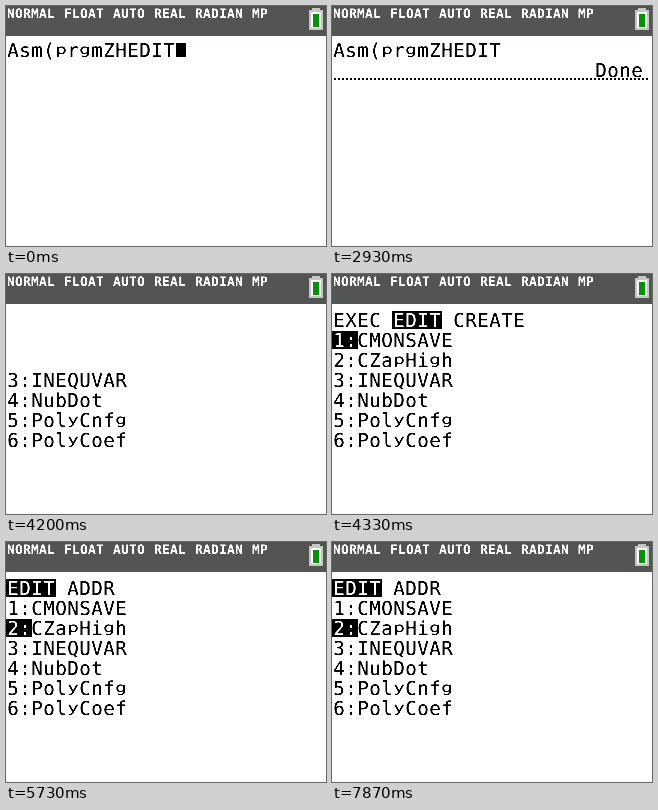
An HTML page that plays this animation: 320x240 px, repeating every 8000 ms.

```html
<!DOCTYPE html>
<html lang="en">
<head>
<meta charset="utf-8">
<title>Calculator program menu</title>
<style>
html, body { margin: 0; width: 100%; height: 100%; overflow: hidden; background: #fff; }
svg { display: block; width: 320px; height: 240px; }
text { font-family: "DejaVu Sans Mono", monospace; text-rendering: geometricPrecision; filter: url(#crisp); }
.large { font-size: 19.2px; letter-spacing: .44px; }
.status { font-size: 13px; font-weight: bold; letter-spacing: .174px; word-spacing: 1px; fill: #fff; }
</style>
</head>
<body>
<svg viewBox="0 0 320 240">
  <defs>
    <filter id="crisp">
      <feComponentTransfer><feFuncA type="linear" slope="2.4" intercept="-.6"/></feComponentTransfer>
    </filter>
  </defs>
  <rect width="320" height="240" fill="#fff"/>
  <rect width="320" height="30" fill="#525552"/>
  <text class="status" x="1" y="12">NORMAL FLOAT AUTO REAL RADIAN MP</text>
  <g id="battery">
    <path d="M306 2h8v2h3v20h-14V4h3z" fill="#c6c6c6"/>
    <rect x="305" y="6" width="10" height="16" fill="#fff"/>
    <rect x="307" y="8" width="6" height="13" fill="#009200"/>
  </g>
  <g id="screen"></g>
</svg>
<script>
const LOOP = 8000, CELL = 12, ROW = 20, CAP = 14, X_HEIGHT = 10.5;
const screen = document.getElementById('screen');

const rect = (x, y, w, h, fill = '#000') =>
  `<rect x="${x}" y="${y}" width="${w}" height="${h}" fill="${fill}"/>`;

// Letters with tails are squeezed so that they stand on the baseline.
function write(str, x, base, fill = '#000') {
  let out = '';
  for (const run of str.matchAll(/[gpy]|[^gpy ]+/g)) {
    const left = x + run.index * CELL + .22;
    const place = /[gpy]/.test(run[0])
      ? `transform="translate(${left} ${base - X_HEIGHT}) scale(1 .7)" y="${X_HEIGHT}"`
      : `x="${left}" y="${base}"`;
    out += `<text class="large" fill="${fill}" ${place}>${run[0]}</text>`;
  }
  return out;
}

// Home screen
const homeLine = (str, row, x = 1) => write(str, x, 37 + row * ROW + CAP);
const cursor = (col, row) => rect(2 + col * CELL, 37 + row * ROW, 10, CAP);
const busy = '<circle cx="297.5" cy="10" r="3.2" fill="none" stroke="#ff0" stroke-width="2" stroke-dasharray="1.7 .81"/>';
const command = homeLine('Asm(prgmZHEDIT', 0);
const prompt = command + cursor(14, 0);
const done = command + homeLine('Done', 1, 263) +
  '<path d="M2 73H316" stroke="#000" stroke-width="2" stroke-dasharray="2 2"/>';
const ready = done + cursor(0, 2);

// Menus
const programs = ['CMONSAVE', 'CZapHigh', 'INEQUVAR', 'NubDot', 'PolyCnfg', 'PolyCoef'];

function label(str, col, row, lit) {
  const x = col * CELL, top = 37 + row * ROW;
  const box = lit ? rect(x, top, str.length * CELL + 2, 18) : '';
  return box + write(str, x + 1, top + 2 + CAP, lit ? '#fff' : '#000');
}

function tabs(names, lit) {
  let col = 0, out = '';
  names.forEach((name, i) => {
    out += label(name, col, 0, i === lit);
    col += name.length + 1;
  });
  return out;
}

function list(lit, from = 1, to = 6) {
  let out = '';
  for (let n = from; n <= to; n++)
    out += label(n + ':', 0, n, n === lit) + label(programs[n - 1], 2, n);
  return out;
}

const programTabs = lit => tabs(['EXEC', 'EDIT', 'CREATE'], lit);
const editTabs = tabs(['EDIT', 'ADDR'], 0);
const editMenu = lit => editTabs + list(lit);
const halfColon = label('2:', 0, 2) + rect(14, 88, 12, 8, '#fff');

const steps = [
  [0, prompt], [70, command], [470, prompt], [800, command], [1130, prompt],
  [1530, command], [1600, command + busy], [1670, busy], [1800, command + busy],
  [1870, ready], [2200, done], [2600, ready], [2930, done],
  [3200, ''], [3270, programTabs(0)], [3330, programTabs(0) + list(1, 1, 2)],
  [3400, programTabs(0) + list(1, 1, 4)], [3470, programTabs(0) + list(1)],
  [4200, list(0, 3)], [4270, programTabs(1) + list(1, 1, 2)], [4330, programTabs(1) + list(1)],
  [5070, list(0, 3)], [5130, editTabs], [5200, editTabs + list(1, 1, 1) + halfColon],
  [5270, editTabs + list(1, 1, 4)], [5330, editMenu(1)],
  [5730, editMenu(2)], [5930, editMenu(0)], [6000, editMenu(3)],
  [6200, editMenu(4)], [6930, editMenu(3)], [7870, editMenu(2)]
];

let shown = -1;
const start = performance.now();

function draw() {
  const t = (performance.now() - start) % LOOP;
  const now = steps.findLastIndex(step => step[0] <= t);
  if (now !== shown) {
    shown = now;
    screen.innerHTML = steps[now][1];
  }
  requestAnimationFrame(draw);
}
draw();
</script>
</body>
</html>
```
